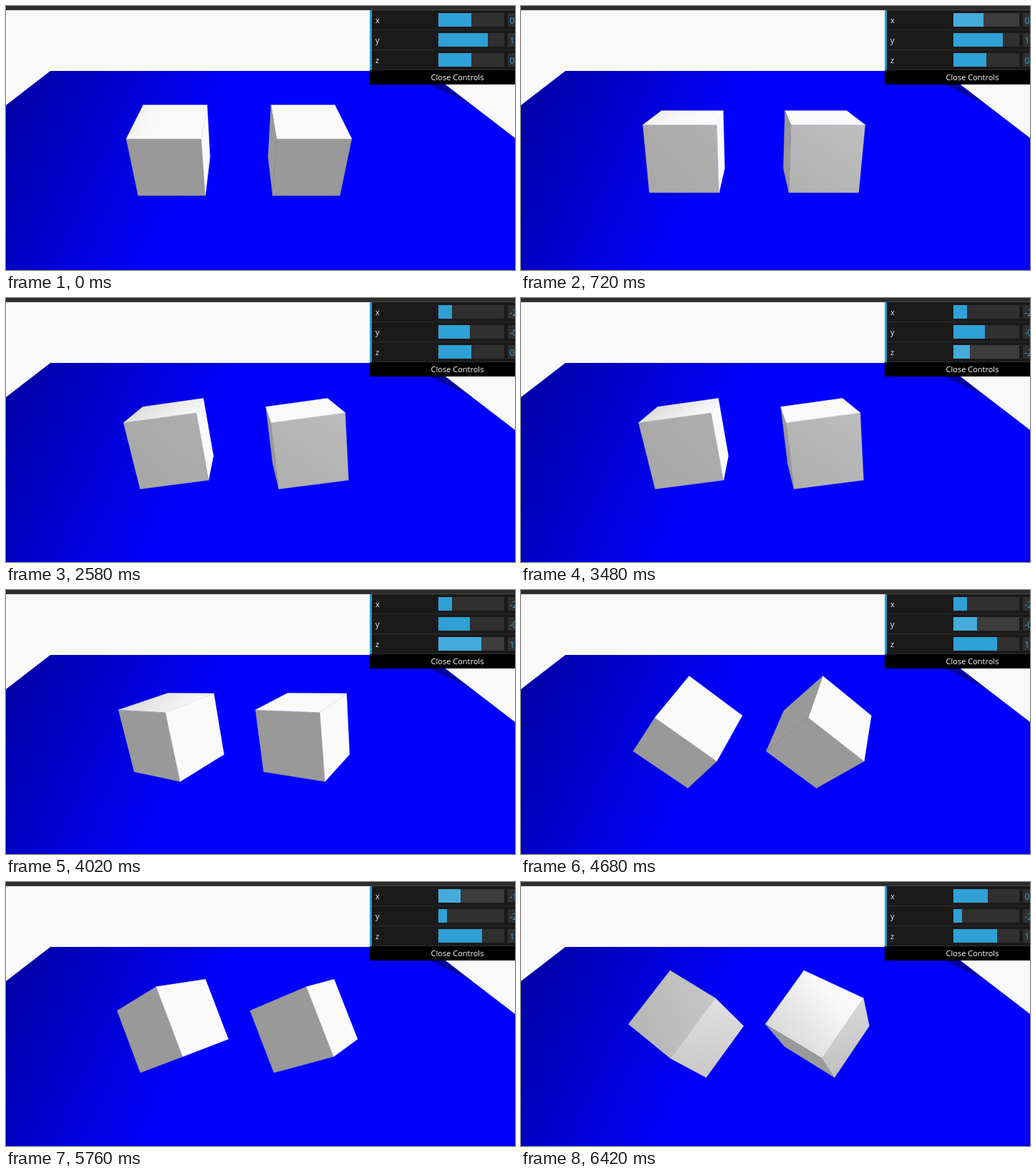
Recreate the animation shown at these times as an HTML page with a canvas. Size 711x370 px, loop 6480 ms.

```html
<!DOCTYPE html>
<html lang="en">
<head>
<meta charset="utf-8">
<title>Rotating cubes</title>
<style>
  html, body { margin: 0; width: 100%; height: 100%; overflow: hidden; background: #fafafa; }
  canvas { display: block; }
</style>
</head>
<body>
<canvas id="stage" width="711" height="370"></canvas>
<script>
const ctx = document.getElementById('stage').getContext('2d');
const LOOP = 6480, STEP = 60;

// Slider values in radians as [time, value] keys
const TRACKS = {
  x: [[600, 0], [1080, -1.844], [5340, -1.844], [6300, 0.14]],
  y: [[1440, 1.57], [1800, -0.42], [2100, 0.08], [2460, -0.14], [4440, -0.14], [5040, -2.32]],
  z: [[2640, 0], [3240, -1.75], [3480, -1.57], [3960, 0.9], [4020, 0.955], [4200, 1.02]]
};
const HOVERS = [['x', 60, 1140], ['y', 1200, 2520], ['z', 2640, 4200], ['y', 4260, 5160], ['x', 5220, 6360]];

const CAMERA = { y: 3, z: 4.5, focal: 495, cx: 325.5, cy: 200.6 };
const PITCH = Math.atan2(CAMERA.y, CAMERA.z);
const LIGHT = { pos: [5, 6, -0.1], power: 39.6, ambient: 0.6 };

function valueAt(keys, t) {
  if (t <= keys[0][0]) return keys[0][1];
  for (let i = 1; i < keys.length; i++) {
    const [t0, a] = keys[i - 1], [t1, b] = keys[i];
    if (t <= t1) {
      const u = (t - t0) / (t1 - t0);
      return a + (b - a) * u * u * (3 - 2 * u);
    }
  }
  return keys[keys.length - 1][1];
}

function spin(a, b, angle) {
  const c = Math.cos(angle), s = Math.sin(angle);
  return [a * c - b * s, a * s + b * c];
}

function rotate([x, y, z], r) {
  [x, y] = spin(x, y, r.z);
  [z, x] = spin(z, x, r.y);
  [y, z] = spin(y, z, r.x);
  return [x, y, z];
}

function project([x, y, z]) {
  const ahead = CAMERA.z - z, below = CAMERA.y - y;
  const depth = ahead * Math.cos(PITCH) + below * Math.sin(PITCH);
  const down = below * Math.cos(PITCH) - ahead * Math.sin(PITCH);
  const k = CAMERA.focal / depth;
  return [CAMERA.cx + x * k, CAMERA.cy + down * k];
}

const dot = (a, b) => a[0] * b[0] + a[1] * b[1] + a[2] * b[2];
const minus = (a, b) => a.map((v, i) => v - b[i]);

function brightness(point, normal) {
  const toLight = minus(LIGHT.pos, point);
  const d2 = dot(toLight, toLight);
  return LIGHT.ambient + LIGHT.power * dot(normal, toLight) / (d2 * Math.sqrt(d2));
}

function grey(v) {
  const c = Math.min(250, Math.round(255 * Math.max(LIGHT.ambient, v)));
  return `rgb(${c},${c},${c})`;
}

// Linear gradient that follows the brightness of three projected corners
function shade(pts, lum) {
  const [p, q, , r] = pts;
  const ax = q[0] - p[0], ay = q[1] - p[1], bx = r[0] - p[0], by = r[1] - p[1];
  const da = lum[1] - lum[0], db = lum[3] - lum[0], det = ax * by - ay * bx;
  const gx = (da * by - db * ay) / det, gy = (db * ax - da * bx) / det;
  const g2 = gx * gx + gy * gy;
  const lo = Math.min(...lum), hi = Math.max(...lum);
  if (g2 < 1e-12 || hi <= LIGHT.ambient) return grey(hi);
  const at = v => [p[0] + gx * (v - lum[0]) / g2, p[1] + gy * (v - lum[0]) / g2];
  const gradient = ctx.createLinearGradient(...at(lo), ...at(hi));
  for (let i = 0; i <= 8; i++) gradient.addColorStop(i / 8, grey(lo + (hi - lo) * i / 8));
  return gradient;
}

function polygon(pts, fill) {
  ctx.beginPath();
  pts.forEach(p => ctx.lineTo(...p));
  ctx.closePath();
  ctx.fillStyle = fill;
  ctx.fill();
}

function drawCube(cx, rot) {
  const eye = [0, CAMERA.y, CAMERA.z];
  for (let axis = 0; axis < 3; axis++) {
    for (const side of [-0.5, 0.5]) {
      const unit = [0, 0, 0];
      unit[axis] = side * 2;
      const normal = rotate(unit, rot);
      const corners = [[-0.5, -0.5], [0.5, -0.5], [0.5, 0.5], [-0.5, 0.5]].map(([a, b]) => {
        const v = [0, 0, 0];
        v[axis] = side;
        v[(axis + 1) % 3] = a;
        v[(axis + 2) % 3] = b;
        const w = rotate(v, rot);
        return [w[0] + cx, w[1], w[2]];
      });
      if (dot(normal, minus(eye, corners[0])) <= 0) continue;
      const pts = corners.map(project);
      polygon(pts, shade(pts, corners.map(c => brightness(c, normal))));
      ctx.strokeStyle = ctx.fillStyle;
      ctx.lineWidth = 0.4;
      ctx.stroke();
    }
  }
}

function rect(x, y, w, h, fill) {
  ctx.fillStyle = fill;
  ctx.fillRect(x, y, w, h);
}

function text(str, x, y, fill, size, align = 'left') {
  ctx.font = `${size}px "Open Sans", "Noto Sans", sans-serif`;
  ctx.textAlign = align;
  ctx.fillStyle = fill;
  ctx.fillText(str, x, y);
}

function drawFloor() {
  const blue = ctx.createLinearGradient(51, 23, 314, 138);
  blue.addColorStop(0, '#0000a6');
  blue.addColorStop(1, '#0000ff');
  polygon([[62, 91], [589, 91], [711, 185], [711, 370], [0, 370], [0, 139]], blue);
  polygon([[589, 91], [650, 138.5], [585, 107]], '#0000a0');
}

function drawPanel(values, t) {
  rect(508, 6, 203, 104, '#000');
  const hover = HOVERS.find(([, from, to]) => t >= from && t < to);
  ['x', 'y', 'z'].forEach((name, i) => {
    const top = 6 + i * 28, v = values[name], hot = hover && hover[0] === name;
    rect(508, top, 203, 27, '#1a1a1a');
    rect(508, top + 27, 203, 1, '#2c2c2c');
    rect(508, top, 3, 28, '#2fa1d6');
    text(name, 516, top + 18, '#eee', 11);
    rect(604, top + 4, 92, 19, hot && t >= 540 ? '#3c3c3c' : '#303030');
    rect(604, top + 4, Math.round(46 + 46 * v / Math.PI), 19, hot ? '#44abda' : '#2fa1d6');
    rect(701, top + 4, 10, 19, '#303030');
    const label = name === 'y' ? v.toFixed(1) : String(Math.round(v) || 0);
    text(label, 703.5, top + 19, '#2fa1d6', 12);
  });
  text('Close Controls', 630.5, 104, '#fff', 11, 'center');
}

function draw(now) {
  const t = Math.floor((now % LOOP) / STEP) * STEP;
  const values = {};
  for (const name in TRACKS) values[name] = valueAt(TRACKS[name], t);
  rect(0, 0, 711, 370, '#fafafa');
  drawFloor();
  drawCube(-1, values);
  drawCube(1, values);
  rect(0, 0, 711, 5, '#2e2b2b');
  rect(0, 5, 711, 1, '#4a4848');
  drawPanel(values, t);
}

let start;
function frame(now) {
  start ??= now;
  draw(now - start);
  requestAnimationFrame(frame);
}
draw(0);
requestAnimationFrame(frame);
</script>
</body>
</html>
```
